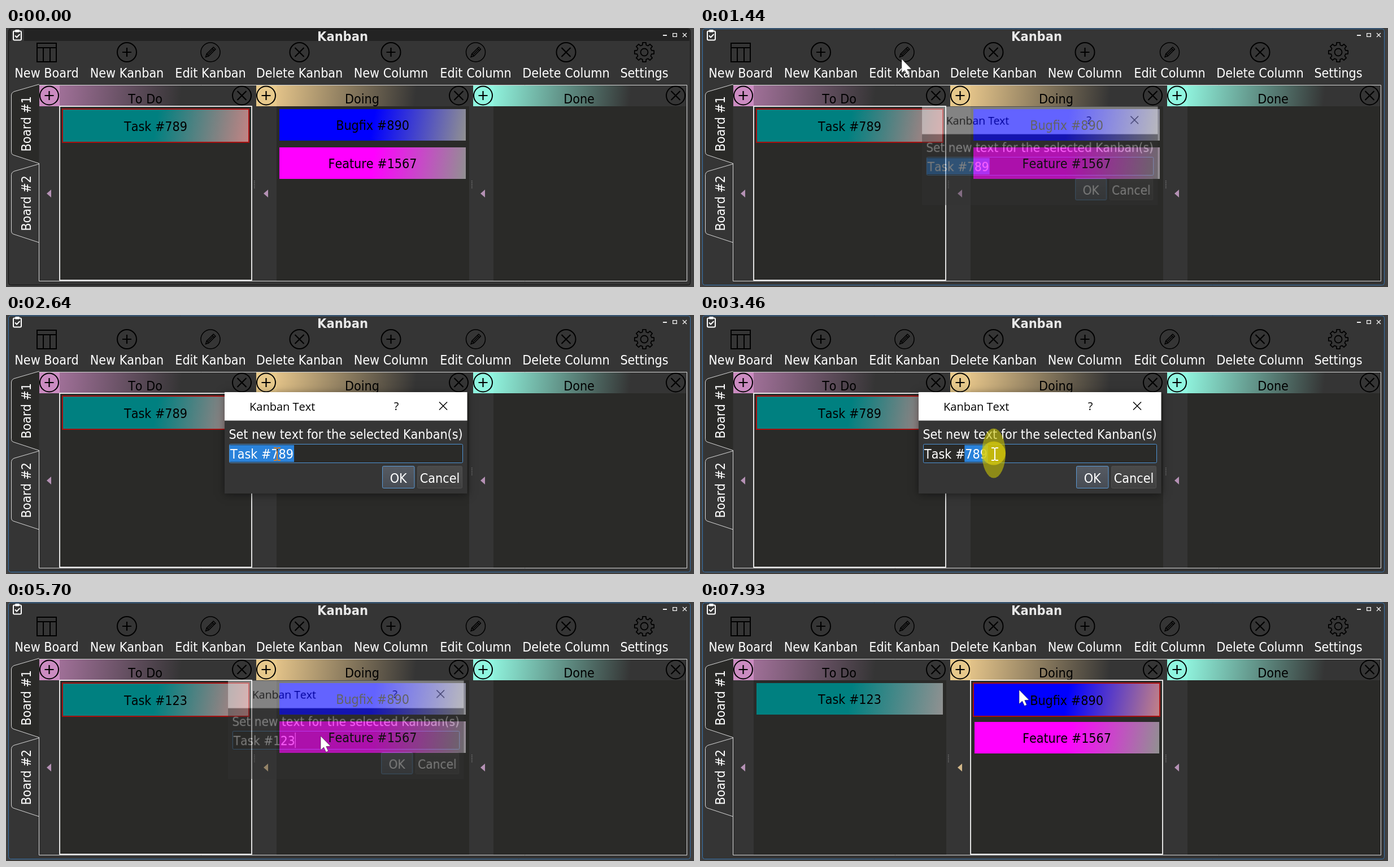
These frames come from a looping animation (1218 px wide and 460 px high, 8000 ms). An HTML page with a canvas:

```html
<!DOCTYPE html>
<html lang="en">
<head>
<meta charset="utf-8">
<title>Kanban</title>
<style>
  html, body { margin: 0; width: 100%; height: 100%; overflow: hidden; background: #404040; }
  canvas { display: block; }
</style>
</head>
<body>
<canvas id="stage" width="1218" height="460"></canvas>
<script>
const stage = document.getElementById('stage');
const layer = document.createElement('canvas');
layer.width = stage.width;
layer.height = stage.height;
const screen2d = stage.getContext('2d'), layer2d = layer.getContext('2d');
let ctx = screen2d;   // current drawing target

const LOOP = 8000;
const SANS = '"DejaVu Sans", sans-serif';
const PANEL = '#353535', DARK = '#2a2a28', LINE = '#d8d8d8';
const CONDENSE = 0.9;   // narrow cut of the interface face

// time, kind, x, y, pressed
const POINTER = [
  [0, ''],
  [420, 'arrow', 700, 192], [620, 'arrow', 620, 160], [820, 'arrow', 545, 130],
  [1030, 'arrow', 420, 80], [1240, 'arrow', 357, 55, true], [1440, 'arrow', 357, 55],
  [1840, 'arrow', 410, 145], [2040, 'beam', 455, 246], [2440, 'beam', 470, 247],
  [2640, 'beam', 480, 247], [2860, 'beam', 472, 247, true], [3060, 'beam', 476, 247, true],
  [3460, 'beam', 522, 247, true], [3660, 'beam', 544, 247, true], [4080, 'beam', 546, 247],
  [4480, 'beam', 554, 243], [4680, 'beam', 559, 240], [5700, 'arrow', 557, 238],
  [6710, 'arrow', 574, 205], [6910, 'arrow', 589, 174], [7930, 'arrow', 565, 156]
];

// time, opacity, scale
const DIALOG = [[0, 0, 1], [1440, 0.39, 0.972], [1640, 1, 1], [5700, 0.39, 0.972], [5900, 0, 1]];

// time, text, selection start
const FIELD = [[0, 'Task #789', 0], [2860, 'Task #789', 9], [3460, 'Task #789', 6], [5080, 'Task #123', 9]];

const COLUMNS = [
  { x: 59, name: 'To Do', tint: '#cb8bc1', head: '#a07098', fade: 310 },
  { x: 443, name: 'Doing', tint: '#e7c98b', head: '#e3c389', fade: 725 },
  { x: 827, name: 'Done', tint: '#8ff6e0', head: '#8ff2dc', fade: 1105 }
];

const TOOLS = [
  ['New Board', 72, board], ['New Kanban', 214, plusIcon], ['Edit Kanban', 362, pencil],
  ['Delete Kanban', 519.5, crossIcon], ['New Column', 681.5, plusIcon],
  ['Edit Column', 831.5, pencil], ['Delete Column', 991.5, crossIcon], ['Settings', 1130, gear]
];

const at = (keys, t) => keys.reduce((found, key) => key[0] <= t ? key : found);

function rect(x, y, w, h, color) {
  ctx.fillStyle = color;
  ctx.fillRect(x, y, w, h);
}

function frame(x, y, w, h, color, width = 1) {
  ctx.strokeStyle = color;
  ctx.lineWidth = width;
  ctx.strokeRect(x + width / 2, y + width / 2, w - width, h - width);
}

function round(x, y, w, h, r, fill, stroke, width = 1) {
  ctx.beginPath();
  ctx.roundRect(x, y, w, h, r);
  if (fill) { ctx.fillStyle = fill; ctx.fill(); }
  if (stroke) { ctx.strokeStyle = stroke; ctx.lineWidth = width; ctx.stroke(); }
}

function lines(color, width, ...paths) {
  ctx.strokeStyle = color;
  ctx.lineWidth = width;
  ctx.beginPath();
  for (const p of paths) {
    ctx.moveTo(p[0], p[1]);
    for (let i = 2; i < p.length; i += 2) ctx.lineTo(p[i], p[i + 1]);
  }
  ctx.stroke();
}

function circle(x, y, r, color, width) {
  ctx.strokeStyle = color;
  ctx.lineWidth = width;
  ctx.beginPath();
  ctx.arc(x, y, r, 0, Math.PI * 2);
  ctx.stroke();
}

function moved(x, y, turn, draw) {
  ctx.save();
  ctx.translate(x, y);
  ctx.rotate(turn);
  draw();
  ctx.restore();
}

// Text centred vertically on y.
function label(s, x, y, color, align = 'center', font = '23.1px ' + SANS) {
  ctx.save();
  ctx.font = font;
  ctx.fontKerning = 'none';
  ctx.fillStyle = color;
  ctx.textAlign = align;
  ctx.translate(x, y + 8.5);
  ctx.scale(CONDENSE, 1);
  ctx.fillText(s, 0, 0);
  ctx.restore();
}

function textWidth(s) {
  ctx.font = '23.1px ' + SANS;
  ctx.fontKerning = 'none';
  return ctx.measureText(s).width * CONDENSE;
}

function fadeAlong(x, y, w, h, ...stops) {
  const g = ctx.createLinearGradient(x, y, x + w, y + h);
  stops.forEach(([offset, color]) => g.addColorStop(offset, color));
  return g;
}

function plusIcon(x, y, r = 17) {
  circle(x, y, r, '#000', 2);
  lines('#000', 2.2, [x - 8, y, x + 8, y], [x, y - 8, x, y + 8]);
}

function crossIcon(x, y, r = 17) {
  circle(x, y, r, '#000', 2);
  lines('#000', 2.2, [x - 8, y - 8, x + 8, y + 8], [x + 8, y - 8, x - 8, y + 8]);
}

function board(x, y) {
  frame(x - 18, y - 17, 36, 35, '#000', 2);
  lines('#000', 2, [x - 18, y - 8, x + 18, y - 8], [x - 6, y - 8, x - 6, y + 18], [x + 6, y - 8, x + 6, y + 18]);
}

function pencil(x, y) {
  circle(x, y, 17, '#000', 1.5);
  moved(x, y, Math.PI / 4, () => {
    lines('#000', 1.5, [-2.6, 7, -2.6, -10, 2.6, -10, 2.6, 7, 0, 12, -2.6, 7, 2.6, 7],
      [-2.6, -7, 2.6, -7], [0, -6, 0, 6]);
  });
}

function gear(x, y) {
  ctx.beginPath();
  for (let i = 0; i < 8; i++) {
    const a = i * Math.PI / 4;
    for (const [da, r] of [[-0.25, 13.2], [-0.17, 17.4], [0.17, 17.4], [0.25, 13.2]])
      ctx.lineTo(x + r * Math.sin(a + da), y - r * Math.cos(a + da));
  }
  ctx.closePath();
  ctx.lineJoin = 'round';
  ctx.strokeStyle = '#000';
  ctx.lineWidth = 1.8;
  ctx.stroke();
  ctx.lineJoin = 'miter';
  circle(x, y, 6.5, '#000', 1.8);
}

function drawWindow(focused) {
  rect(0, 0, 1218, 460, '#404040');
  round(4.5, 1.5, 1207, 455, 4, PANEL, focused ? '#3672ad' : '#101010');
  if (!focused) {
    rect(6, 2, 1204, 21, '#232323');
    rect(9, 2, 23, 21, PANEL);
  }
  // Clipboard
  round(13, 5.5, 14, 16, 2, null, '#fff', 2);
  round(16, 3, 8, 4.5, 1.5, '#fff');
  lines('#fff', 2, [16, 13.5, 19, 16.5, 24.5, 11]);

  label('Kanban', 596, 14, '#e8e8e8', 'center', 'bold 23.4px ' + SANS);
  rect(1163, 12, 7, 2, '#eee');
  frame(1180, 9, 8, 7, '#eee', 1.3);
  lines('#eee', 1.4, [1198, 9, 1205, 16], [1205, 9, 1198, 16]);

  for (const [name, x, icon] of TOOLS) {
    icon(x, 43);
    label(name, x, 79.5, '#fff');
  }
}

function tab(name, top, bottom, fill) {
  ctx.beginPath();
  ctx.moveTo(58.5, top);
  ctx.lineTo(14, top + 13);
  ctx.quadraticCurveTo(9.5, top + 15, 9.5, top + 19);
  ctx.lineTo(9.5, bottom - 20);
  ctx.quadraticCurveTo(9.5, bottom - 16, 13, bottom - 15);
  ctx.lineTo(58.5, bottom);
  ctx.fillStyle = fill;
  ctx.fill();
  ctx.strokeStyle = LINE;
  ctx.lineWidth = 1;
  ctx.stroke();
  moved(35.5, (top + bottom) / 2, -Math.PI / 2, () => label(name, 0, 0, '#fff'));
}

function card(name, color, x, y, w, h, selected) {
  rect(x, y, w, h, fadeAlong(x, y, w, h, [0, color], [0.5, color], [1, selected ? '#c68484' : '#919191']));
  if (selected) frame(x, y, w, h, '#a81010', 2);
  label(name, x + w / 2, y + h / 2 + 0.5, '#000');
}

function column({ x, name, tint, head, fade }, cards, selected, arrow) {
  const list = x + 36;
  rect(x, 102, 36, 37, tint);
  const reach = fade - list;
  rect(list, 102, 341, 37, fadeAlong(list, 102, reach, reach * 0.1, [0, head], [1, PANEL]));
  plusIcon(x + 17.5, 120, 16.5);
  crossIcon(x + 358.5, 120, 16.5);
  label(name, x + 187.5, 125, '#000');

  rect(list, 139, 341, 310, DARK);
  if (selected) frame(list - 0.8, 138.2, 341.6, 310.6, '#fff', 1.7);
  ctx.fillStyle = arrow;
  ctx.beginPath();
  ctx.moveTo(x + 13, 294);
  ctx.lineTo(x + 21, 287);
  ctx.lineTo(x + 21, 301);
  ctx.fill();

  cards.forEach(([text, color], i) => {
    if (!selected) card(text, color, list + 5, 144 + i * 68, 330, 56);
    else if (i === 0) card(text, color, list + 4, 143, 332, 61, true);
    else card(text, color, list + 7, 145 + i * 68, 327, 56);
  });
}

function drawBoard(t) {
  rect(59, 102, 1146, 348, PANEL);
  tab('Board #1', 100, 240.5, DARK);
  tab('Board #2', 241.5, 381, PANEL);
  lines(LINE, 1, [58.5, 101.5, 1205.5, 101.5, 1205.5, 449.5, 58.5, 449.5, 58.5, 240]);

  const renamed = t >= 5700, active = t >= 7530 ? 1 : 0;
  const cards = [
    [[renamed ? 'Task #123' : 'Task #789', '#008080']],
    [['Bugfix #890', '#0000ff'], ['Feature #1567', '#ff00ff']],
    []
  ];
  COLUMNS.forEach((c, i) =>
    column(c, cards[i], i === active, i === 1 && renamed ? '#d3b88a' : '#b591b5'));
  for (const x of [439, 824])
    for (let y = 271; y < 285; y += 3) rect(x, y, 1.5, 1.5, '#777');
}

function button(name, x, w, top, bottom, edge) {
  const g = ctx.createLinearGradient(0, 268, 0, 308);
  g.addColorStop(0, top);
  g.addColorStop(1, bottom);
  round(x + 0.5, 268.5, w - 1, 39, 2, g, edge);
  label(name, x + w / 2, 289, '#fff');
}

function drawField(t) {
  const [, text, from] = at(FIELD, t);
  round(395.5, 229.5, 413, 33, 2, DARK, '#4f94d6');
  const left = 397, start = left + textWidth(text.slice(0, from));
  const end = left + textWidth(text);
  if (from < text.length) rect(start - 1, 231, end - start + 2, 30, '#2a82da');
  else if (t >= 5080) rect(end, 232, 1, 28, '#fff');
  label(text, left, 246.5, '#fff', 'left');
}

function paintDialog(t, shadow) {
  ctx.clearRect(0, 0, 1218, 460);
  ctx.shadowColor = 'rgba(0,0,0,.45)';
  ctx.shadowBlur = shadow;
  ctx.shadowOffsetY = shadow && 2;
  rect(387, 137, 429.5, 180, PANEL);
  ctx.shadowColor = 'transparent';
  rect(387, 137, 429.5, 50.5, '#fff');

  ctx.font = '20px "Open Sans", sans-serif';
  ctx.fillStyle = '#000';
  ctx.textAlign = 'left';
  ctx.fillText('Kanban Text', 431, 170);
  ctx.textAlign = 'center';
  ctx.fillText('?', 691, 169);
  lines('#000', 1.5, [767, 154.5, 781, 168.5], [781, 154.5, 767, 168.5]);

  label('Set new text for the selected Kanban(s)', 601.5, 211, '#fff');
  drawField(t);
  button('OK', 666, 57.5, '#565b63', '#474c54', '#5a9ad6');
  button('Cancel', 728, 80, '#4a4a4a', '#404040', '#505050');
}

// Painted on its own layer so that it fades as one sheet.
function drawDialog(t) {
  const [, opacity, scale] = at(DIALOG, t);
  if (!opacity) return;
  ctx = layer2d;
  paintDialog(t, opacity < 1 ? 0 : 14);
  ctx = screen2d;
  moved(602, 227, 0, () => {
    ctx.globalAlpha = opacity;
    ctx.scale(scale, scale);
    ctx.drawImage(layer, -602, -227);
  });
}

function highlight(x, y) {
  for (const [ry, color] of [[44, 'rgba(200,195,5,.6)'], [21, 'rgba(222,206,10,.68)']]) {
    ctx.fillStyle = color;
    ctx.beginPath();
    ctx.ellipse(x, y, 21, ry, 0, 0, Math.PI * 2);
    ctx.fill();
  }
}

function arrowShape() {
  ctx.beginPath();
  for (const [x, y] of [[0, 0], [0, 25], [5.5, 20], [9.5, 28.5], [13.5, 26.8], [9.8, 18.5], [17.5, 18]])
    ctx.lineTo(x, y);
  ctx.closePath();
  ctx.fillStyle = '#fff';
  ctx.fill();
  ctx.strokeStyle = 'rgba(0,0,0,.55)';
  ctx.lineWidth = 0.8;
  ctx.stroke();
}

function drawPointer(t) {
  const [, kind, x, y, pressed] = at(POINTER, t);
  if (!kind) return;
  if (pressed) highlight(x - 2, y - 1.5);
  moved(x, y, 0, () => {
    if (kind === 'arrow') return arrowShape();
    // The text pointer inverts what lies below it.
    if (!pressed) ctx.globalCompositeOperation = 'difference';
    lines('#fff', 2, [-6, -11, -1, -11], [1, -11, 6, -11], [0, -11, 0, 11], [-6, 11, -1, 11], [1, 11, 6, 11]);
  });
}

function render(now) {
  const t = now % LOOP;
  drawWindow(t >= 1240);
  drawBoard(t);
  drawDialog(t);
  drawPointer(t);
}

const began = performance.now();
function tick() {
  render(performance.now() - began);
  requestAnimationFrame(tick);
}
tick();
</script>
</body>
</html>
```
